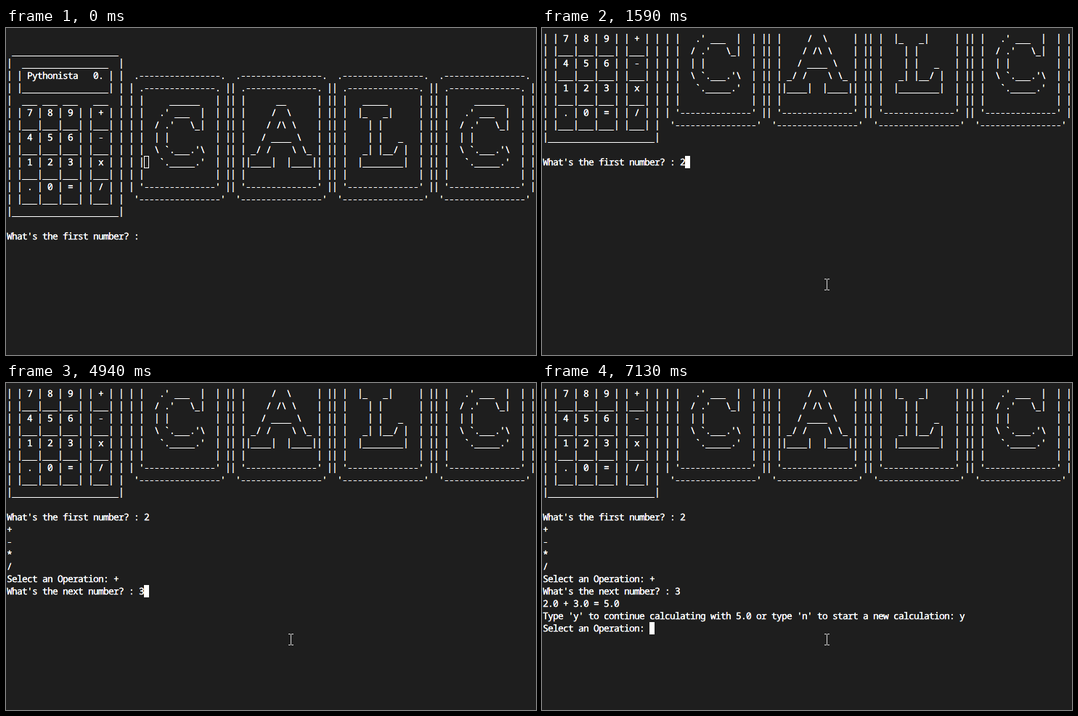
An HTML page with a canvas that plays this animation: 730 px wide and 450 px high, repeating every 8000 ms.

```html
<!DOCTYPE html>
<html lang="en">
<head>
<meta charset="utf-8">
<title>Terminal calculator</title>
<style>
html, body { margin: 0; width: 100%; height: 100%; overflow: hidden; background: #1e1e1e; }
canvas { display: block; }
</style>
</head>
<body>
<canvas id="stage" width="730" height="450"></canvas>
<pre id="art" hidden>
 _____________________
|  _________________  |
| | Pythonista   0. | |  .----------------.  .----------------.  .----------------.  .----------------.
| |_________________| | | .--------------. || .--------------. || .--------------. || .--------------. |
|  ___ ___ ___   ___  | | |     ______   | || |      __      | || |   _____      | || |     ______   | |
| | 7 | 8 | 9 | | + | | | |   .' ___  |  | || |     /  \     | || |  |_   _|     | || |   .' ___  |  | |
| |___|___|___| |___| | | |  / .'   \_|  | || |    / /\ \    | || |    | |       | || |  / .'   \_|  | |
| | 4 | 5 | 6 | | - | | | |  | |         | || |   / ____ \   | || |    | |   _   | || |  | |         | |
| |___|___|___| |___| | | |  \ `.___.'\  | || | _/ /    \ \_ | || |   _| |__/ |  | || |  \ `.___.'\  | |
| | 1 | 2 | 3 | | x | | | |   `._____.'  | || ||____|  |____|| || |  |________|  | || |   `._____.'  | |
| |___|___|___| |___| | | |              | || |              | || |              | || |              | |
| | . | 0 | = | | / | | | '--------------' || '--------------' || '--------------' || '--------------' |
| |___|___|___| |___| |  '----------------'  '----------------'  '----------------'  '----------------'
|_____________________|
</pre>
<script>
const ctx = document.getElementById('stage').getContext('2d');
const art = document.getElementById('art').textContent.replace(/^\n|\n$/g, '').split('\n');
const LOOP = 8000, CELL = 7, ROW = 17, LEFT = 1, TOP = 23, CLIP = 6, BASE = 13;
const WHITE = '#ffffff', BACK = '#1e1e1e';

// Each entry appends text to the session at the given time.
const log = [
  [0, "\nWhat's the first number? : "],
  [1590, '2'],
  [1740, '\n+\n-\n*\n/\nSelect an Operation: '],
  [2800, '+'],
  [3070, "\nWhat's the next number? : "],
  [4940, '3'],
  [5070, "\n2.0 + 3.0 = 5.0\nType 'y' to continue calculating with 5.0 or type 'n' to start a new calculation: "],
  [6600, 'y'],
  [7060, '\n'],
  [7130, 'Select an Operation: ']
];
const FOCUS = 670, SCROLL = 1590;
const MOVE = { start: 170, step: 71.5, count: 7, from: [482, 397], to: [392, 353] };

// Subpixel rendering: one pass per colour channel, a third of a pixel apart.
const channels = [['#e10000', 1 / 3], ['#00e100', 0], ['#0000e1', -1 / 3]];

function rect(x, y, w, h, color) {
  ctx.fillStyle = color;
  ctx.fillRect(x, y, w, h);
}

function drawChar(ch, x, y) {
  if (ch === '|') {
    ctx.fillRect(x + 3.15, y + 2, 1.4, 14);
  } else if (ch === '_') {
    ctx.fillRect(x, y + 15, CELL, 1);
  } else if (ch === '-') {
    ctx.fillRect(x + 1.6, y + 9, 4.4, 1);
  } else if (ch !== ' ') {
    ctx.fillText(ch, x, y + BASE);
    ctx.strokeText(ch, x, y + BASE);
  }
}

function drawText(lines, top) {
  ctx.save();
  ctx.font = "12.83px 'Noto Sans Mono', monospace";
  ctx.textRendering = 'geometricPrecision';
  ctx.globalCompositeOperation = 'lighter';
  ctx.lineWidth = 0.3;
  for (const [color, shift] of channels) {
    ctx.fillStyle = ctx.strokeStyle = color;
    lines.forEach((line, row) => {
      [...line].forEach((ch, col) => drawChar(ch, LEFT + col * CELL + shift, top + row * ROW));
    });
  }
  ctx.restore();
}

function drawCursor(lines, top, focused) {
  if (focused) {
    const last = lines.length - 1;
    rect(LEFT + lines[last].length * CELL, top + last * ROW, CELL, ROW, WHITE);
  } else {
    ctx.strokeStyle = WHITE;
    ctx.lineWidth = 1;
    ctx.strokeRect(LEFT + 27 * CELL + 0.5, TOP + 9 * ROW + 0.5, CELL - 1, ROW - 1);
  }
}

function drawPointer(step) {
  if (step < 0) return;
  const p = step / (MOVE.count - 1), ease = p * (2 - p);
  const [x, y] = MOVE.from.map((v, i) => Math.round(v + (MOVE.to[i] - v) * ease));
  for (const dy of [-8, 7]) {
    rect(x - 3, y + dy, 3, 1, '#d8d8d8');
    rect(x + 1, y + dy, 3, 1, '#d8d8d8');
  }
  rect(x, y - 7, 1, 14, '#d8d8d8');
}

let shown = '';

function draw(t) {
  const entries = log.filter(([at]) => at <= t);
  const step = Math.min(MOVE.count - 1, Math.floor((t - MOVE.start) / MOVE.step));
  const focused = t >= FOCUS;
  const state = [entries.length, Math.max(-1, step), focused].join();
  if (state === shown) return;
  shown = state;

  const lines = art.concat(entries.map(([, text]) => text).join('').split('\n'));
  const top = TOP - (t >= SCROLL ? 6 * ROW : 0);
  rect(0, 0, 730, 450, BACK);
  ctx.save();
  ctx.beginPath();
  ctx.rect(0, CLIP, 730, 450 - CLIP);
  ctx.clip();
  drawText(lines, top);
  drawCursor(lines, top, focused);
  ctx.restore();
  drawPointer(step);
}

const begin = performance.now();
function tick() {
  draw((performance.now() - begin) % LOOP);
  requestAnimationFrame(tick);
}
tick();
</script>
</body>
</html>
```
